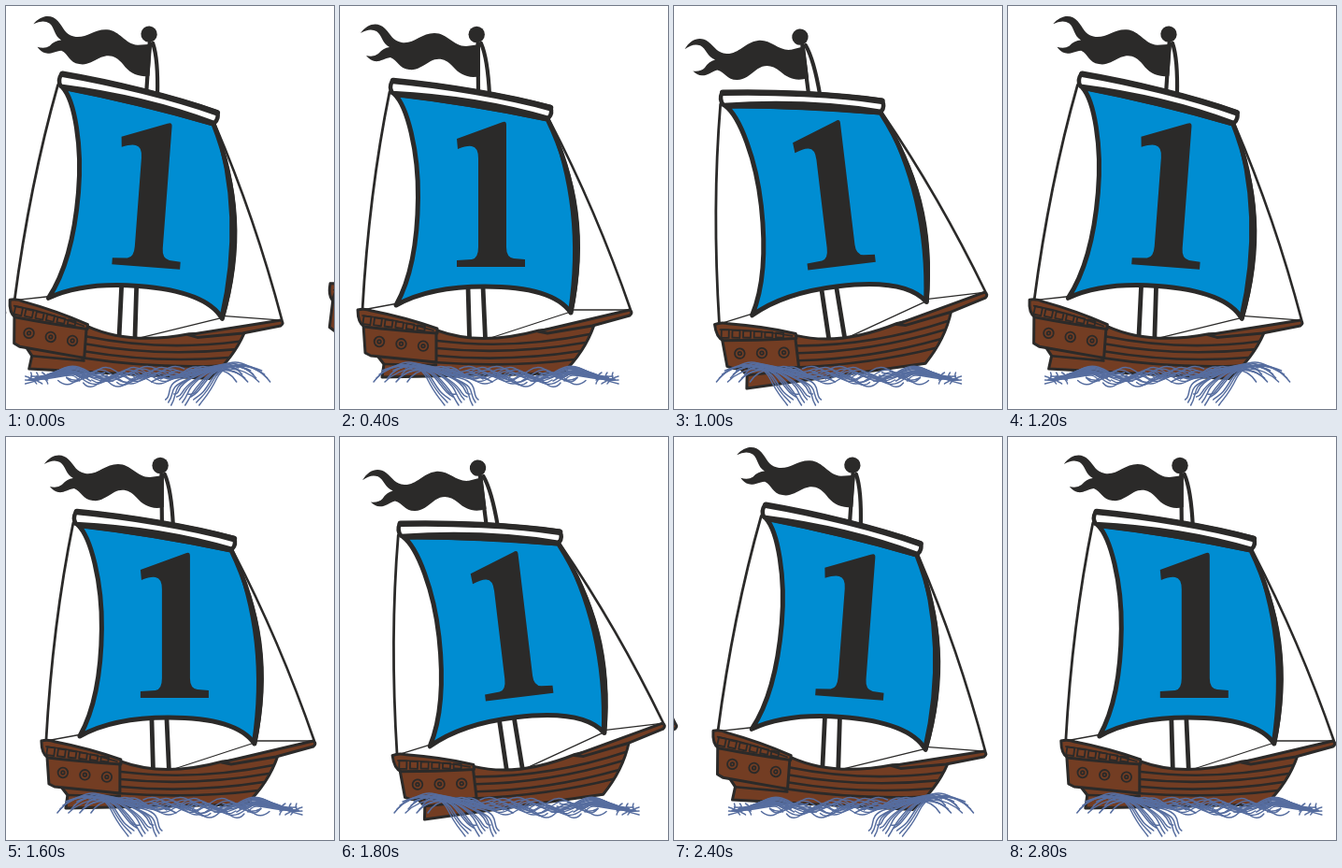
These frames come from a looping animation (351 by 431 pixels, 3000 ms). An HTML page:

```html
<!DOCTYPE html>
<html lang="en">
<head>
<meta charset="utf-8">
<title>Sailing ship</title>
<style>
  html, body { margin: 0; width: 100%; height: 100%; overflow: hidden; background: #fff; }
  svg { display: block; }
  .ink { fill: #2b2a29; }
  .line { fill: none; stroke: #2b2a29; stroke-linecap: round; stroke-linejoin: round; }
  .wood { fill: #733d23; stroke: #2b2a29; stroke-width: 3; stroke-linejoin: round; }
  #waves { fill: none; stroke: #566d9f; stroke-width: 1.5; stroke-linecap: round; }
</style>
</head>
<body>
<svg width="351" height="431" viewBox="0 0 351 431">
  <defs>
    <g id="ship">
      <!-- rigging -->
      <g class="line">
        <path stroke-width="2.8" d="M53 92Q31 200 24 325"/>
        <path stroke-width="2.6" d="M224 122Q274 218 311 325"/>
        <path stroke-width="1.3" d="M24 325L62 318M247 325H311M158 356L247 327"/>
        <path stroke-width="4.8" d="M137 300L138.5 354M153 300L155.5 356"/>
        <path stroke-width="4.2" d="M147.500 40L148 92M151 40Q158 56 160 95"/>
      </g>

      <!-- flag -->
      <circle class="ink" cx="146.2" cy="30.500" r="8.700"/>
      <path class="ink" d="M22 29C30 18 41 17 48 24C55 31 56 37 66 39C79 41 87 29 101 29C115 29 121 43 135 43L150 41V75C137 78 128 73 121 65C113 56 105 55 97 59C87 65 82 69 74 68C63 67 62 58 54 55C47 56 43 60 37 59Q32 58 28 53Q36 55 41 51Q46 45 53 44C45 40 45 31 39 27Q32 23 22 29Z"/>

      <!-- sail -->
      <path fill="#008dd2" stroke="#2b2a29" stroke-width="5" stroke-linejoin="round" d="M58 94Q140 104 222 121Q269 218 247 328C232 306 195 300 155 300C120 300 85 306 60 320C74 295 83 255 83.500 205C84 155 72 107 58 94Z"/>
      <path class="ink" d="M221 119Q274 214 249 329L244 327Q261 216 221 119Z"/>
      <path class="line" stroke-width="5" d="M62 95Q142 104 222 121"/>

      <!-- yard -->
      <path fill="#fff" stroke="#2b2a29" stroke-width="4.500" stroke-linejoin="round" d="M56 80C110 84 178 96 225 108Q228 115 223 120C172 105 112 96 56 93Q52 87 56 80Z"/>
      <path class="line" stroke-width="6.500" d="M57 80C110 85 178 96 225 109"/>

      <path class="ink" role="img" aria-label="1" d="M173 124.500Q178 122 178 127V258Q178 269 186 270L198 271V279H125V272L141 271Q148 270 148 258V163Q148 151 141 150Q136 149 126 153L125 142Z"/>

      <!-- hull -->
      <path class="wood" d="M45 397L47 383L40 374L104 347Q150 364 213 347L272 341Q262 370 238 393Z"/>
      <path class="wood" d="M212 348L310 325Q314 328 310 331L270 342L222 350Z"/>
      <path class="wood" d="M25 341L27 371L33 374L103 381V347Z"/>
      <path class="wood" stroke-width="3.500" d="M19 325Q26 323 34 326Q70 333 104 345V350Q60 347 26 343Q19 339 19 325Z"/>
      <g class="line">
        <path stroke-width="2.600" d="M104 358Q184 368 267 351M104 366Q180 374 262 360M104 374Q180 381 257 369M100 381Q180 387 251 378M47 383L103 384"/>
        <path stroke-width="1.600" d="M24 331Q60 335 100 347"/>
        <g id="fittings" stroke-width="1.800"></g>
      </g>
    </g>
    <g id="waves"></g>
  </defs>
  <g id="scene"></g>
</svg>
<script>
const STAGE = 351, STEP = 200, COUNT = 15;
const DRIFT = 3.15;
const TILTS = [4.3, 10.8, 0, -6.8, -11.800, -6.8];
const $ = id => document.getElementById(id);
const range = (n, fn) => Array.from({ length: n }, (_, i) => fn(i)).join('');

$('fittings').innerHTML =
  range(6, i => `<rect x="${25 + 11.5 * i}" y="${332 + 2 * i}" width="8" height="${8.5 - i * .7}" transform="rotate(8 ${29 + 11.5 * i} ${336 + 2 * i})"/>`) +
  range(3, i => `<g transform="translate(${42 + 23.5 * i} ${359 + 2.3 * i})"><circle r="5.3"/><circle r="1.800"/></g>`);

// Spray at the left, ripples along the hull, a fan of spray at the right.
const strand = d => `<path d="${d}"/>`;
$('waves').innerHTML =
  range(13, i => strand(`M${36 + 3 * i} ${402 - (i % 4) * 4}C${56 + 2.5 * i} ${376 + 2 * (i % 5)} ${84 + 2 * i} ${380 + i} ${93 + 3 * i} ${398 + i % 3}S${104 + 3 * i} ${416 - i % 4} ${112 + 3 * i} ${427 - (i % 5) * 3}`)) +
  range(8, i => strand(`M${60 + 5 * i} ${385 + i}q14 -8 26 0t22 ${3 + i % 4}t20 ${3 + i % 3}`)) +
  range(14, i => strand(`M${98 + 6 * i} ${388 + (i % 5) * 2.5}q11 -6 22 2t22 0t22 2t${18 + i % 3 * 3} ${i % 4}`)) +
  range(13, i => strand(`M${204 + 3 * i} ${401 - (i % 4) * 3}C${224 + 2 * i} ${402 - i} ${236 + 1.5 * i} ${379 + 1.5 * i} ${256 + 2 * i} ${387 + i}S${266 + 2 * i} ${396 + i % 3 * 3} ${298 - (i % 5) * 6} ${404 - (i % 4) * 4}`));

function picture(step, offset) {
  const k = (step + COUNT) % COUNT;
  const tilt = TILTS[k % TILTS.length];
  const mirror = tilt > 0 ? 'translate(325 0) scale(-1 1)' : '';
  return `<g transform="translate(${offset + DRIFT * (k - 2)} 0)">
    <use href="#ship" transform="rotate(${tilt} 158 206)"/>
    <use href="#waves" transform="${mirror}"/></g>`;
}

let shown = -1;
function draw() {
  const step = Math.floor(performance.now() / STEP) % COUNT;
  if (step !== shown) {
    shown = step;
    // Neighbouring poses overhang into the stage from either side.
    $('scene').innerHTML = [-1, 0, 1].map(n => picture(step + n, n * STAGE)).join('');
  }
  requestAnimationFrame(draw);
}
draw();
</script>
</body>
</html>
```
